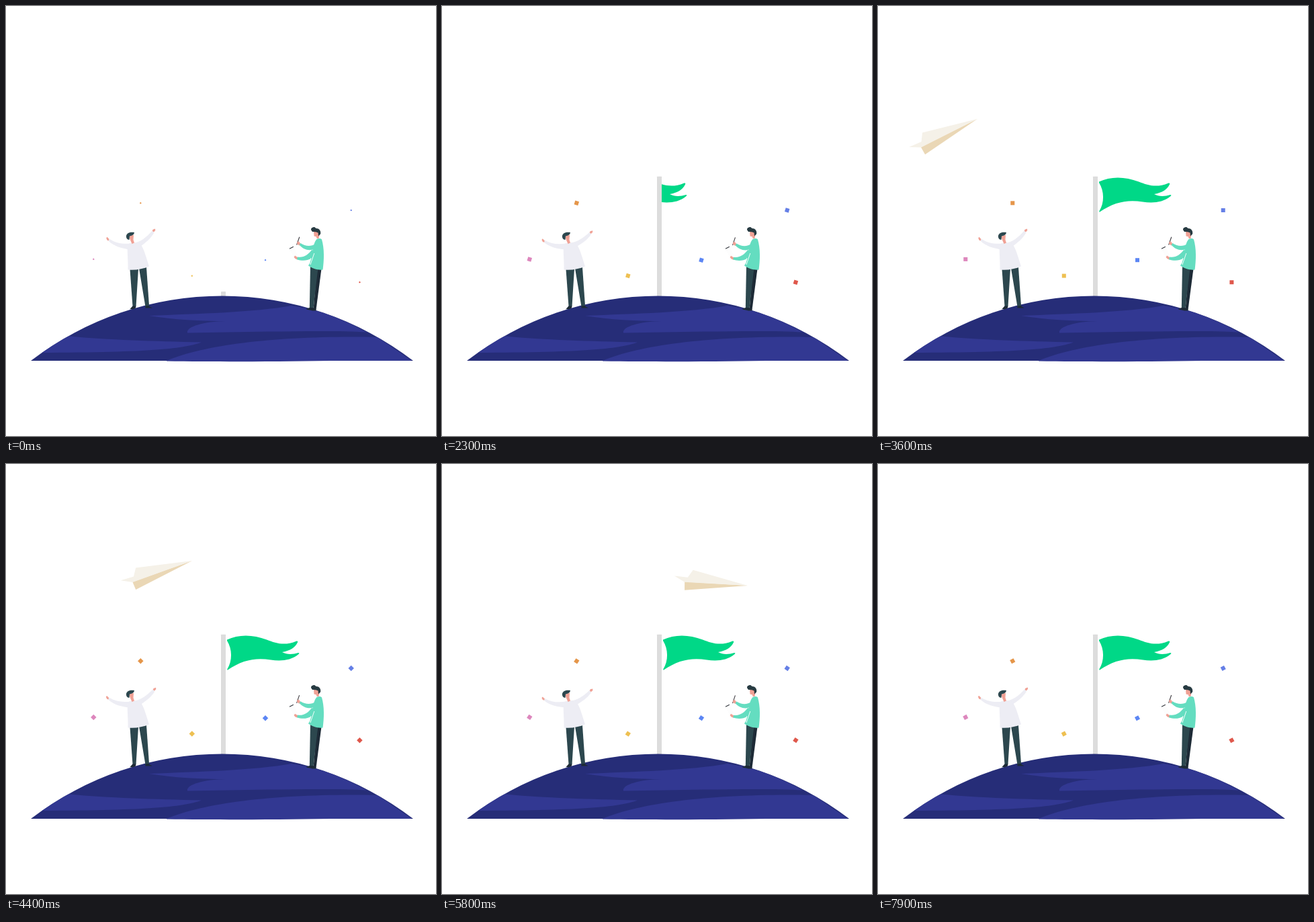
These frames come from a looping animation (640 by 640 pixels, 8000 ms). An HTML page with a canvas:

```html
<!DOCTYPE html>
<html lang="en">
<head>
<meta charset="utf-8">
<title>Flag on the hill</title>
<style>
html, body { margin: 0; width: 100%; height: 100%; overflow: hidden; background: #fff; }
canvas { display: block; width: 640px; height: 640px; }
</style>
</head>
<body>
<canvas id="stage"></canvas>
<script>
const LOOP = 8000, STEP = 100, SIZE = 640;
const canvas = document.getElementById('stage');
const ctx = canvas.getContext('2d');
const dpr = window.devicePixelRatio || 1;
canvas.width = canvas.height = SIZE * dpr;

const DARK = '#262d78', LIGHT = '#323892';
const SKIN = '#f0a195', SHIRT = '#ededf4', MINT = '#64ddc0';
const SLATE = '#2c474e', INK = '#1d2a36';

const clamp = v => Math.max(0, Math.min(1, v));
const ease = (t, a, b) => (1 - Math.cos(Math.PI * clamp((t - a) / (b - a)))) / 2;
const mix = (a, b, k) => a + (b - a) * k;
const rad = d => d * Math.PI / 180;

function shape(d, color) {
  ctx.fillStyle = color;
  ctx.fill(new Path2D(d));
}

function line(d, color, width) {
  ctx.strokeStyle = color;
  ctx.lineWidth = width;
  ctx.stroke(new Path2D(d));
}

function group(draw) {
  ctx.save();
  draw();
  ctx.restore();
}

function turned(x, y, deg, draw) {
  group(() => {
    ctx.translate(x, y);
    ctx.rotate(rad(deg));
    ctx.translate(-x, -y);
    draw();
  });
}

// Smooth curve through keys [time, ...values]
function spline(keys, t, c) {
  let i = 0;
  while (i < keys.length - 2 && t > keys[i + 1][0]) i++;
  const a = keys[i], b = keys[i + 1], h = b[0] - a[0];
  const slope = j => {
    const p = keys[Math.max(0, j - 1)], n = keys[Math.min(keys.length - 1, j + 1)];
    return (n[c] - p[c]) / (n[0] - p[0]);
  };
  const u = (t - a[0]) / h, v = 1 - u;
  return v * v * (1 + 2 * u) * a[c] + u * u * (3 - 2 * u) * b[c]
    + h * u * v * (v * slope(i) - u * slope(i + 1));
}

function hill() {
  const edge = 'M37 528A467.6 467.6 0 0 1 606 528Z';
  shape(edge, DARK);
  group(() => {
    ctx.clip(new Path2D(edge));
    shape('M213 461C285 458 370 456 425 446L452 451C484 459 512 472 537 485.500C500 483 440 484 390 484.500L270 486.500C268 477 295 469.500 327 469C290 469 250 467 213 461Z', LIGHT);
    shape('M30 490L95 491.500C150 497 220 499 291 500.500C262 511 205 516 30 516Z', LIGHT);
    shape('M239 528C300 502 420 490 553 493L604 528Z', LIGHT);
  });
  shape('M239 527.500H500C420 529.500 320 529.500 239 528.500Z', LIGHT);
}

function pole(t) {
  const top = t < 1000 ? mix(425, 248, ease(t, 0, 1000)) : mix(248, 253.700, ease(t, 1000, 1500));
  ctx.fillStyle = '#dcdcdc';
  ctx.beginPath();
  ctx.roundRect(320, top, 7, 440 - top, .6);
  ctx.fill();
}

function flag(t) {
  if (t < 1900) return;
  group(() => {
    ctx.beginPath();
    ctx.rect(327, 230, 140, 100);
    ctx.clip();
    ctx.translate(mix(-110, 0, ease(t, 1900, 2900)), 0);
    shape('M329 261.500C346 253.500 367 253.500 388 261.500C402 267 415 271 432.500 263.500Q435 263 434 265.500C430 274 422 278 411 280C418 284 427 283.500 435 281Q437.500 281 435.500 283C424 293 408 293.500 394 291.500C370 288 352 292 330 306.500Q328.500 307 329.500 305C337 293 337 276 329 263Z', '#00d887');
  });
}

const flight = [
  [2700, -33, 229, -27], [2800, -11, 221, -27], [3600, 148, 168, -25],
  [4400, 277, 144, -18], [5200, 376, 160, 0], [5800, 455, 181, 5],
  [6300, 604, 222, 7], [6400, 645, 233, 7], [6500, 694, 246, 7], [6800, 880, 296, 7]
];

function plane(t) {
  if (t < 2800 || t > 6800) return;
  group(() => {
    ctx.translate(spline(flight, t, 1), spline(flight, t, 2));
    ctx.rotate(rad(spline(flight, t, 3)));
    shape('M0 0L-94 2.500L-93 15Z', '#ead7b5');
    shape('M0 0L-83 -16L-90 -4.500L-110 -5L-94 3Z', '#f5f1e8');
  });
}

const confetti = [
  [200.3, 293.3, '#e5964a'], [130.3, 376.9, '#dd87bd'], [276.8, 401.6, '#eec052'],
  [386, 378.2, '#5c86f4'], [513.7, 304, '#657fe6'], [526.4, 411.2, '#df584c']
];

function pieces(t) {
  const side = 6 * mix(.32, 1, ease(t, -100, 800));
  for (const [x, y, color] of confetti) {
    turned(x, y, (t - 3600) * 45 / 800, () => {
      ctx.fillStyle = color;
      ctx.fillRect(x - side / 2, y - side / 2, side, side);
    });
  }
}

function cheerer(drop) {
  // legs and shoes
  shape('M184.500 392L197 390.500L193.500 447H188.500Z', SLATE);
  shape('M198 390.500L209 389L213 446L207.500 447.500Z', SLATE);
  shape('M188.500 446.500H193.500L193 449.500C190 451.500 187 451.500 184.500 451Z', INK);
  shape('M207.500 446.500L213 446C214 448 216 448 217.500 449.500H207.500Z', INK);
  // arms
  turned(184, 357, -5 * drop, () => {
    shape('M154 347.500L150.500 343.800L149.200 345.500L150.500 348.500L154 350Z', SKIN);
    shape('M186 353.500C173 354.500 164 353 153.500 346.500L152.500 349.500C161 358 172 360.500 184 362.500Z', SHIRT);
  });
  turned(194, 356, 6.5 * drop, () => {
    shape('M217.500 335.500L218.500 332.800L222 331.500L222.300 334L220 336.500Z', SKIN);
    shape('M189 353.500C201 351 209 344 217.500 334.500L220.500 337C216 346 208 352 200 358L192 361Z', SHIRT);
  });
  // torso
  shape('M181 354.500C187 352 196 351.500 200 354C206 362 209 376 213 387.500C204 391.500 193 393.500 181.500 392.500C182 378 180 365 181 354.500Z', SHIRT);
  // head
  shape('M183 343L190 340.500L189.500 348L191 352.500L187.500 354L185.500 349.500Z', SKIN);
  shape('M191 337C190.500 341 187 342 184 342.500L183.500 348C180.500 348 178.500 345 179 342C180 337.500 185 336 191 337Z', SLATE);
}

function writer(drop) {
  // legs and shoes
  shape('M463 389L469.500 391L461.500 452H457.500Z', INK);
  shape('M453 387L464.500 390L457.500 450H451.800Z', SLATE);
  shape('M452 449H457L461.500 451V453.500H456C452 452 449 452.500 446.500 451.200Z', INK);
  // head
  shape('M458 335L467 336L465.500 346H462.500L462 343.500L458.500 342.500Z', SKIN);
  shape('M454 333C454 330 456.500 329.500 458 329C460 328.500 460 330.500 462 331C467 331 469 336 468 339.500L465 342.500L464.500 337.500C461 335.500 458 337 455.500 335.500Z', '#273b42');
  // notepad
  shape('M421.500 361.500L428 358L434 371L428.500 374Z', '#fdfdfd');
  line('M422 361.200L427.800 358.200', '#35383e', 1.2);
  // arms
  turned(462, 360, -1.5 * drop, () => {
    line('M436.800 343.800L432.600 355.500', '#3d3b40', 1.1);
    shape('M433.500 351L436 350.500L438.500 354L436.500 356.500L433 354Z', SKIN);
    shape('M436.500 355.500L438.500 353C446 358 454 358 461 354L460 361C452 365.500 443 363 436.500 355.500Z', MINT);
  });
  turned(462, 366, -.6 * drop, () => {
    shape('M434 374L430 371.500L428.500 374L431 376.500L434 377.500Z', SKIN);
    shape('M433 377.200L434 373.500C443 375 450 370 455 363L463 366C457 378 445 381 433 377.200Z', MINT);
  });
  // torso
  shape('M462.500 347C465.500 345.500 468.500 345.500 470 347.500C474 361 473.500 378 471.500 392.500C464 393.500 456 390.500 450 386.500C457 375 455 355 462.500 347Z', MINT);
  line('M458.800 368L453 385M454 375L451.500 384', '#f2fffb', 1);
}

function draw(t) {
  ctx.setTransform(dpr, 0, 0, dpr, 0, 0);
  ctx.fillStyle = '#fff';
  ctx.fillRect(0, 0, SIZE, SIZE);
  const drop = (1 - Math.cos(2 * Math.PI * t / 3600)) / 2;
  pole(t);
  flag(t);
  hill();
  pieces(t);
  cheerer(drop);
  writer(drop);
  plane(t);
}

const start = performance.now();
function tick() {
  const t = (performance.now() - start) % LOOP;
  draw(Math.floor(t / STEP) * STEP);
  requestAnimationFrame(tick);
}
tick();
</script>
</body>
</html>
```
